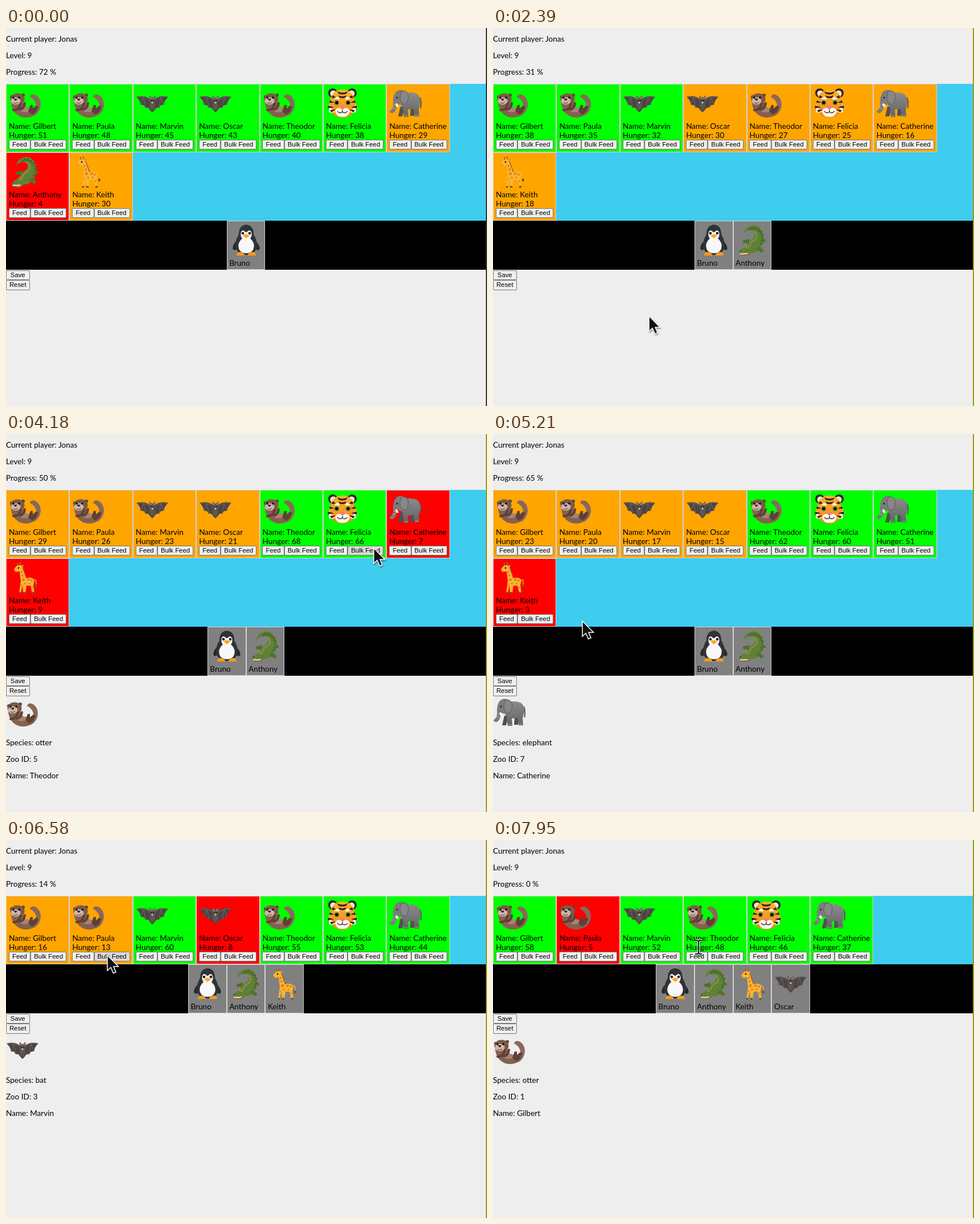
An HTML page that plays this animation: 845 by 663 pixels, repeating every 7990 ms.

```html
<!DOCTYPE html>
<html lang="en">
<head>
<meta charset="utf-8">
<title>Zoo game</title>
<style>
  html, body { margin: 0; width: 100%; height: 100%; overflow: hidden; background: #eee; }
  #stage { position: relative; width: 845px; height: 663px; overflow: hidden; font: 13.6px/16px Lato, sans-serif; color: #000; }
  #stage div, #stage svg { position: absolute; box-sizing: border-box; white-space: nowrap; }
  .card { border: 1px solid #d3d3d3; }
  .button { height: 17.5px; border: 1px solid #767676; border-radius: 2px; background: #efefef;
    font: 11.35px/15.5px "Liberation Sans", Arial, sans-serif; text-align: center; }
  .button.hover { background: #dadada; }
  #edge { right: 0; top: 0; width: 2px; height: 663px; }
  #pointer { left: 0; top: 0; overflow: visible; filter: drop-shadow(1px 2px 1px #0006); }
</style>
</head>
<body>
<svg width="0" height="0" style="position:absolute">
  <defs>
    <linearGradient id="grey" x2="0" y2="1"><stop stop-color="#8b8b8b"/><stop offset="1" stop-color="#626262"/></linearGradient>
    <linearGradient id="fur" x2="0" y2="1"><stop stop-color="#ffb02e"/><stop offset="1" stop-color="#f9861a"/></linearGradient>
    <path id="beamLine" d="M-6-12H-2L0-10L2-12H6M0-10V10M-6 12H-2L0 10L2 12H6"/>
  </defs>

  <symbol id="otter" viewBox="0 0 57 57">
    <path d="M38 47Q52 39 47 27Q44 20 37 17Q38 11 46 13Q56 18 56 31Q55 44 44 50Z" fill="#8a675a"/>
    <path d="M4 27C5 41 14 52 29 53C40 53 47 49 48 42L39 36L30 37L25 26Z" fill="#86604f"/>
    <path d="M15 38Q23 46 34 43L37 37L28 34Z" fill="#a68471"/>
    <path d="M34 42l4-11 4 0 0 6 6-5 4 2-4 9-7 5z" fill="#5d4037"/>
    <circle cx="5" cy="17" r="3" fill="#5d4037"/><circle cx="25" cy="14" r="3" fill="#5d4037"/>
    <ellipse cx="15" cy="21" rx="12.5" ry="10.5" fill="#7d5848"/>
    <ellipse cx="12" cy="24" rx="8.5" ry="6.500" fill="#cdb6a9"/>
    <circle cx="8" cy="18" r="1.7"/><circle cx="18" cy="18" r="1.7"/>
    <path d="M8 20h7l-3 4z" fill="#2b201d"/>
    <path d="M8 27q4 3 8-1" fill="none" stroke="#4e342e"/>
    <path d="M8 40Q18 40 21 29M19 39Q27 38 28 28" fill="none" stroke="#5d4037" stroke-width="4" stroke-linecap="round"/>
  </symbol>

  <symbol id="bat" viewBox="0 0 57 57">
    <path d="M1 17Q13 13 24 20L29 18L34 20Q45 13 57 17Q51 21 49 31Q43 30 41 36Q36 34 33 40L29 44L25 40Q22 34 17 36Q15 30 9 31Q7 21 1 17Z" fill="#4b4444"/>
    <path d="M3 17Q14 15 25 23M14 17L17 35M14 17L9 30M55 17Q44 15 33 23M44 17L41 35M44 17L49 30" fill="none" stroke="#6b605d" stroke-width="1.3"/>
    <path d="M24 14l4 4h2l4-4 1 9-2 4q3 9-4 14q-7-5-4-14l-2-4z" fill="#61554f"/>
    <path d="M25 17l2 4M33 17l-2 4" stroke="#b88a86" stroke-width="1.5"/>
    <circle cx="27" cy="23" r="1"/><circle cx="31" cy="23" r="1"/><path d="M27 26h4l-2 3z" fill="#ddd"/>
  </symbol>

  <symbol id="tiger" viewBox="0 0 57 57">
    <circle cx="12" cy="10" r="8" fill="#2c2724"/><circle cx="46" cy="10" r="8" fill="#2c2724"/>
    <circle cx="13" cy="11" r="5.500" fill="#f5e6d0"/><circle cx="45" cy="11" r="5.500" fill="#f5e6d0"/>
    <path d="M29 4C41 4 49 12 51 25L56 36L52 38L53 43L48 44C43 51 36 53 29 53S15 51 10 44L5 43L6 38L3 36L7 25C9 12 17 4 29 4Z" fill="url(#fur)"/>
    <path d="M3 36L6 30Q9 39 16 43L10 45L5 43L6 38ZM56 36L52 30Q49 39 42 43L48 45L53 43L52 38Z" fill="#fff8ec"/>
    <path d="M29 37Q40 34 42 42Q40 52 29 52T16 42Q18 34 29 37Z" fill="#fff8ec"/>
    <path d="M16 20q4-3 7 1M35 21q3-4 7-1" fill="none" stroke="#fff3dc" stroke-width="4"/>
    <path d="M20 7Q29 12 38 7L36 11Q29 14 22 11ZM22 14Q29 18 36 14L34 18Q29 20 24 18ZM7 23l8 4-9 0zM51 23l-8 4 9 0zM4 32l10 3-11 2zM54 32l-10 3 11 2zM7 40l10-1-7 5zM51 40l-10-1 7 5zM12 14l6 4-8 1zM46 14l-6 4 8 1z" fill="#272321"/>
    <circle cx="19" cy="27" r="4.5" fill="#6f9236"/><circle cx="39" cy="27" r="4.5" fill="#6f9236"/>
    <circle cx="19" cy="27" r="2.8"/><circle cx="39" cy="27" r="2.8"/>
    <path d="M23 34q6-3 12 0l-6 6z" fill="#e78378"/>
    <path d="M29 40v3M20 42q5 5 9 1q4 4 9-1" fill="none" stroke="#3e302b" stroke-width="1.5"/>
  </symbol>

  <symbol id="elephant" viewBox="0 0 57 57">
    <path d="M54 18Q58 27 55 37" fill="none" stroke="#555" stroke-width="2"/>
    <path d="M38 34h8l-2 16h-7zM20 34h8l-5 17h-7z" fill="#505050"/>
    <path d="M24 11Q37 7 48 11Q56 16 55 28L52 38L53 51H45L43 38L33 39L34 52H26L24 35Q18 29 18 20Z" fill="url(#grey)"/>
    <path d="M12 8Q18 2 27 6L29 22L20 31L14 29Q13 42 7 45Q2 46 1 42L4 39Q8 36 7 25Q7 14 12 8Z" fill="#7c7c7c"/>
    <path d="M21 7Q33 4 34 16Q33 28 27 30Q19 26 19 17Z" fill="#878787" stroke="#5a5a5a"/>
    <path d="M11 29Q11 36 17 34L14 28Z" fill="#fff5e0"/>
    <circle cx="14" cy="18" r="1.6" fill="#222"/>
    <path d="M8 31l5 1M6 36l5 1M27 50h6M46 49h6" stroke="#aaa"/>
  </symbol>

  <symbol id="crocodile" viewBox="0 0 57 57">
    <path d="M42 24l9 3 1 4-10 1zM23 26l-11 3 0 4 11 1z" fill="#4b702b"/>
    <path d="M13 17Q15 5 29 2Q42 2 47 15Q51 32 42 43Q34 52 27 50L21 55Q9 57 5 51L6 46L18 39Q21 30 30 25Q37 16 30 12Q20 9 13 17Z" fill="#5f8135"/>
    <path d="M31 12Q40 17 35 26Q24 31 24 39" fill="none" stroke="#87964a" stroke-width="2"/>
    <path d="M22 7l3 3 3-5 2 4 4-4 1 5 5-2 0 5 5 0-2 5 5 1-3 4 3 4-4 3 2 4-5 2" fill="none" stroke="#416329" stroke-width="1.500"/>
    <path d="M40 38l9 8-4 4-10-6z" fill="#4f752d"/>
    <path d="M6 51Q15 52 23 49L20 54Q9 56 6 51Z" fill="#b4592f"/>
    <path d="M7 51l2 2 2-2 2 2 2-2 2 2 2-2 2 1" fill="none" stroke="#fff" stroke-width="1.2"/>
    <circle cx="20" cy="40" r="2.3" fill="#d8b83a"/><circle cx="20" cy="40" r="1"/>
    <circle cx="8" cy="47" r="1" fill="#263c19"/>
  </symbol>

  <symbol id="giraffe" viewBox="0 0 57 57">
    <path d="M45 31Q50 33 47 42" fill="none" stroke="#ecab32" stroke-width="1.5"/><path d="M46 40l3 0 1 5-4 0z" fill="#805034"/>
    <path d="M16 8L15 2M20 8L20 1" stroke="#a76536" stroke-width="2"/>
    <path d="M9 13L14 7L21 6L25 10L30 29Q42 26 45 33L43 41L45 55H41L38 42L31 42L29 56H25L24 41L21 55H18L21 34L19 17L12 18Z" fill="#fbb42d"/>
    <path d="M21 7l5-2-1 5z" fill="#d98931"/>
    <path d="M24 10L31 29" stroke="#a95d2b" stroke-width="1.500"/>
    <path d="M20 17l3-1 1 3-3 1zM22 23l3-1 1 3-3 1zM23 30l4-1 1 4-4 1zM32 31l4-2 1 3-4 2zM39 31l3 1-1 3-3-1zM27 37l3 0-1 3-3-1zM34 37l4 0-1 3zM21 40l2-1-1 5zM40 43l2 1 0 3-2-1z" fill="#d67b2d"/>
    <circle cx="17" cy="11" r="1.3"/><path d="M9 14l4 3-3 1z" fill="#c98037"/>
    <path d="M18 53h3v3h-3zM25 53h4v3h-4zM41 53h4v3h-4z" fill="#73503a"/>
  </symbol>

  <symbol id="penguin" viewBox="0 0 57 57">
    <path d="M16 27Q6 32 5 43L8 46Q16 43 18 37ZM41 27Q51 32 53 43L50 46Q42 43 39 37Z" fill="#26282b"/>
    <path d="M29 1Q42 2 42 18Q49 29 48 41Q43 54 29 54T10 41Q9 29 16 18Q16 2 29 1Z" fill="#303236"/>
    <path d="M28 14Q22 8 20 14Q18 21 22 25Q13 33 16 43Q19 51 29 51T42 43Q45 33 36 25Q40 21 38 14Q35 8 30 14Z" fill="#f8f8f8"/>
    <circle cx="23" cy="16" r="2.2"/><circle cx="35" cy="16" r="2.2"/>
    <path d="M23 20Q29 15 35 20L29 25Z" fill="#ffa81d"/>
    <path d="M12 55Q12 48 19 49Q26 49 26 55ZM32 55Q32 49 39 49Q46 48 46 55Z" fill="#f49a19"/>
  </symbol>
</svg>

<div id="stage">
  <div id="scene"></div>
  <div id="edge"></div>
  <svg id="pointer" width="24" height="36">
    <path id="arrow" d="M0 0V27L6 21.5L10.500 31.500L15 29.500L11 20H19.500Z" fill="#111" stroke="#fff" stroke-width="1.5"/>
    <g id="beam" fill="none">
      <use href="#beamLine" stroke="#fff" stroke-width="4"/>
      <use href="#beamLine" stroke="#111" stroke-width="2"/>
    </g>
  </svg>
</div>

<script>
const LOOP = 7990, ZOO_TOP = 98, ROW = 120, CARD_W = 111.4, GRAVE_W = 67.75;

// species, name, hunger at the start; the position in the list gives the zoo id
const animals = [
  ['otter', 'Gilbert', 51], ['otter', 'Paula', 48], ['bat', 'Marvin', 45], ['bat', 'Oscar', 43],
  ['otter', 'Theodor', 40], ['tiger', 'Felicia', 38], ['elephant', 'Catherine', 29],
  ['crocodile', 'Anthony', 4], ['giraffe', 'Keith', 30],
].map(([species, name, hunger], i) => ({ species, name, hunger, id: i + 1 }));

const feeds = [[3180, 6], [3750, 5], [4700, 7], [5950, 3], [7020, 1]];
const tickTime = k => k <= 11 ? 30 + 195 * (k - 1) : 1980 + 186.5 * (k - 11);
const events = [
  ...feeds.map(([time, id]) => ({ time, id })),
  ...Array.from({ length: 43 }, (_, i) => ({ time: tickTime(i + 1) })),
].sort((a, b) => a.time - b.time);

// [tick, percent]; every death resets the progress
const progress = [[0, 72], [3, 82], [4, 0], [13, 31], [18, 42], [22, 50], [28, 65], [30, 71], [31, 0], [35, 14], [42, 38], [43, 0]];

// [time, x, y]
const path = [
  [2000, 262, 617], [2390, 274, 505], [2760, 500, 330], [3100, 625, 204], [3250, 625, 204],
  [3430, 568, 219], [3650, 520, 205], [3850, 520, 205], [4180, 646, 200], [4500, 740, 205],
  [4720, 740, 205], [5210, 157, 328], [5420, 78, 322], [5700, 78, 322], [5920, 300, 205],
  [6200, 300, 205], [6580, 178, 202], [6800, 72, 205], [7080, 72, 205], [7800, 361, 188],
];

const smooth = u => u * u * (3 - 2 * u);

function sample(keys, at, ease = u => u) {
  const next = keys.findIndex(key => key[0] > at);
  if (next < 0) return keys.at(-1).slice(1);
  if (next === 0) return keys[0].slice(1);
  const a = keys[next - 1], b = keys[next];
  const u = ease((at - a[0]) / (b[0] - a[0]));
  return a.slice(1).map((v, i) => v + (b[i + 1] - v) * u);
}

function simulate(t) {
  const zoo = animals.map(a => ({ ...a }));
  const graves = [{ species: 'penguin', name: 'Bruno' }];
  let ticks = 0, selected = null;
  for (const { time, id } of events) {
    if (time > t) break;
    if (id) {
      selected = zoo.find(a => a.id === id);
      selected.hunger += 50;
      continue;
    }
    ticks++;
    // a death ends the round, so later animals skip it
    for (const animal of zoo) {
      if (--animal.hunger > 0) continue;
      graves.push(...zoo.splice(zoo.indexOf(animal), 1));
      break;
    }
  }
  return { zoo, graves, ticks, selected };
}

const box = (x, y, w, h, color, cls = '') =>
  `<div class="${cls}" style="left:${x}px;top:${y}px;width:${w}px;height:${h}px;background:${color}"></div>`;
const text = (x, middle, s) => `<div style="left:${x}px;top:${middle - 8}px">${s}</div>`;
const emoji = (x, y, species) =>
  `<svg style="left:${x}px;top:${y}px" width="57" height="57"><use href="#${species}"/></svg>`;

function button(x, y, w, label, [px, py]) {
  const hover = px >= x && px < x + w && py >= y && py < y + 17.5 ? ' hover' : '';
  return `<div class="button${hover}" style="left:${x}px;top:${y}px;width:${w}px">${label}</div>`;
}

const moodColor = hunger => hunger > 30 ? '#0f0' : hunger >= 10 ? '#ffa500' : '#f00';

function zooCard(animal, i, pointer) {
  const x = i % 7 * CARD_W, y = ZOO_TOP + Math.floor(i / 7) * ROW;
  return box(x, y, CARD_W, ROW, moodColor(animal.hunger), 'card')
    + emoji(x + 5, y + 6, animal.species)
    + text(x + 5, y + 74, 'Name: ' + animal.name)
    + text(x + 5, y + 90, 'Hunger: ' + animal.hunger)
    + button(x + 4.7, y + 97.5, 38.5, 'Feed', pointer)
    + button(x + 43.2, y + 97.5, 63, 'Bulk Feed', pointer);
}

function graveCard(animal, x, y) {
  return box(x, y, GRAVE_W, 86, '#808080', 'card')
    + emoji(x + 5, y + 6, animal.species) + text(x + 4.5, y + 74, animal.name);
}

function sceneHTML(t, pointer) {
  const { zoo, graves, ticks, selected } = simulate(t);
  const zooHeight = Math.ceil(zoo.length / 7) * ROW;
  const graveTop = ZOO_TOP + zooHeight, end = graveTop + 86;
  const graveLeft = 421.5 - graves.length * GRAVE_W / 2;
  return text(0, 19, 'Current player: Jonas') + text(0, 48, 'Level: 9')
    + text(0, 77, `Progress: ${Math.floor(sample(progress, ticks)[0])} %`)
    + box(0, ZOO_TOP, 843, zooHeight, '#3eccef')
    + zoo.map((a, i) => zooCard(a, i, pointer)).join('')
    + box(0, graveTop, 843, 86, '#000')
    + graves.map((a, i) => graveCard(a, graveLeft + i * GRAVE_W, graveTop)).join('')
    + button(0, end + 0.5, 41.5, 'Save', pointer) + button(0, end + 18, 41.5, 'Reset', pointer)
    + (selected ? emoji(0, end + 36, selected.species)
      + text(0, end + 117, 'Species: ' + selected.species)
      + text(0, end + 146, 'Zoo ID: ' + selected.id)
      + text(0, end + 175, 'Name: ' + selected.name) : '');
}

const $ = id => document.getElementById(id);
let shown = '';

function draw(now) {
  const t = now % LOOP;
  const visible = t >= path[0][0];
  const pointer = visible ? sample(path, t, smooth) : [-99, -99];
  const html = sceneHTML(t, pointer);
  if (html !== shown) $('scene').innerHTML = shown = html;

  const overText = pointer[1] > 164 && pointer[1] < 195;
  $('pointer').style.display = visible ? '' : 'none';
  $('pointer').style.transform = `translate(${pointer[0]}px, ${pointer[1]}px)`;
  $('arrow').style.display = overText ? 'none' : '';
  $('beam').style.display = overText ? '' : 'none';
  $('edge').style.background = t < 1500 ? '#333' : '#9a9a12';
}

const start = performance.now();
function frame() {
  draw(performance.now() - start);
  requestAnimationFrame(frame);
}
frame();
</script>
</body>
</html>
```
